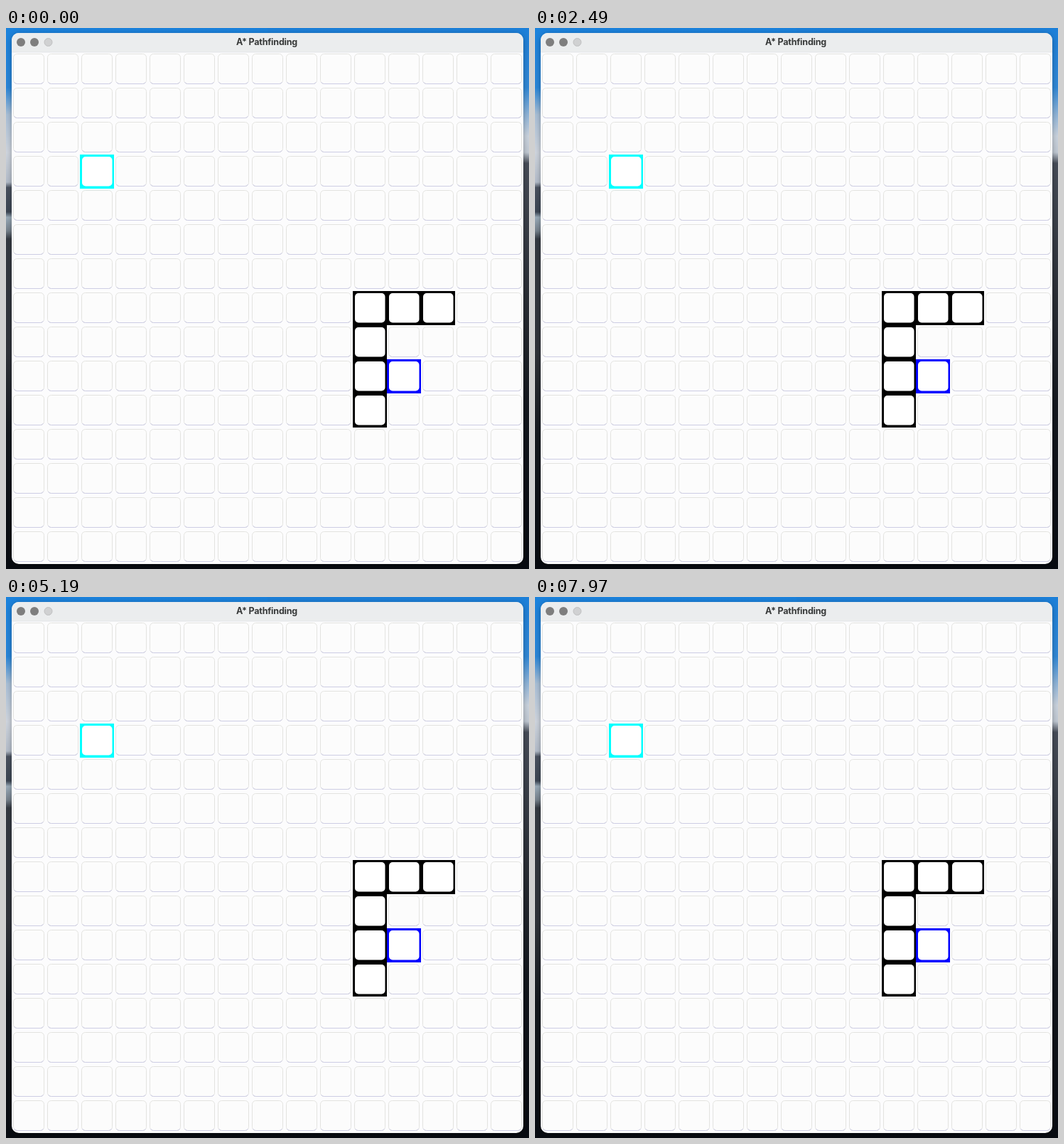
An HTML page that plays this animation: 736x761 px, repeating every 7990 ms.

```html
<!DOCTYPE html>
<html lang="en">
<head>
<meta charset="utf-8">
<title>Pathfinding grid</title>
<style>
  html, body { margin: 0; width: 100%; height: 100%; overflow: hidden; background: #080b11; }
  svg { display: block; width: 736px; height: 761px; }
  .title { font: 700 12.5px Inter, sans-serif; letter-spacing: -.2px; fill: #363838; text-anchor: middle; }
</style>
</head>
<body>
<!-- The scene holds one steady pose, so it loops without timers. -->
<svg viewBox="0 0 736 761">
  <defs>
    <linearGradient id="left" x2="0" y2="1">
      <stop offset="0" stop-color="#1b82dc"/>
      <stop offset=".11" stop-color="#2a86d8"/>
      <stop offset=".16" stop-color="#a9bfd6"/>
      <stop offset=".23" stop-color="#cfd5de"/>
      <stop offset=".285" stop-color="#b4bdca"/>
      <stop offset=".295" stop-color="#4a525f"/>
      <stop offset=".34" stop-color="#3c4654"/>
      <stop offset=".35" stop-color="#9aabb9"/>
      <stop offset=".375" stop-color="#76818c"/>
      <stop offset=".39" stop-color="#353a42"/>
      <stop offset=".6" stop-color="#30333a"/>
      <stop offset=".75" stop-color="#15191f"/>
      <stop offset="1" stop-color="#080b11"/>
    </linearGradient>
    <linearGradient id="right" x2="0" y2="1">
      <stop offset="0" stop-color="#1c7fd8"/>
      <stop offset=".11" stop-color="#3188d6"/>
      <stop offset=".16" stop-color="#8fb4d8"/>
      <stop offset=".2" stop-color="#c9d2dd"/>
      <stop offset=".23" stop-color="#c0c8d2"/>
      <stop offset=".25" stop-color="#474d58"/>
      <stop offset=".5" stop-color="#2a2e35"/>
      <stop offset=".7" stop-color="#14181e"/>
      <stop offset="1" stop-color="#080b11"/>
    </linearGradient>
    <filter id="soft" x="-5%" y="-5%" width="110%" height="110%">
      <feGaussianBlur stdDeviation="4"/>
    </filter>
    <clipPath id="frame"><rect x="8" y="7" width="720" height="747" rx="10"/></clipPath>
    <pattern id="cells" x="8" y="34" width="48" height="48" patternUnits="userSpaceOnUse">
      <rect x="2.5" y="2.5" width="43" height="42" rx="5" fill="#fcfcfc" stroke="#e3e3e0"/>
      <path d="M3.5 42Q4.5 44.5 7.5 44.5H40.5Q43.5 44.5 44.5 42" fill="none" stroke="#cdcde4"/>
    </pattern>
  </defs>

  <rect width="368" height="761" fill="url(#left)"/>
  <rect x="368" width="368" height="761" fill="url(#right)"/>
  <rect x="8" y="9" width="720" height="747" rx="10" opacity=".3" filter="url(#soft)"/>

  <g clip-path="url(#frame)">
    <rect x="8" y="7" width="720" height="747" fill="#fcfcfd"/>
    <rect x="8" y="7" width="720" height="27" fill="#ebedee"/>
    <path d="M8 34H728" stroke="#e3e5e7"/>
    <rect x="8" y="34" width="720" height="720" fill="url(#cells)"/>
    <g id="marks"></g>
  </g>

  <circle cx="21" cy="20" r="6" fill="#7e7e7e"/>
  <circle cx="40" cy="20" r="6" fill="#7e7e7e"/>
  <circle cx="59.5" cy="20" r="5.5" fill="#d0d1d2" stroke="#bfc0c1"/>
  <text class="title" x="367" y="24.3">A* Pathfinding</text>
</svg>
<script>
  const marks = document.getElementById('marks');
  const CELL = 48, LEFT = 8, TOP = 34;

  function addRect(x, y, width, height, rx, fill) {
    const rect = document.createElementNS(marks.namespaceURI, 'rect');
    for (const [key, value] of Object.entries({ x, y, width, height, rx, fill })) {
      rect.setAttribute(key, value);
    }
    marks.append(rect);
  }

  function markCell(col, row, color) {
    const x = LEFT + col * CELL, y = TOP + row * CELL;
    addRect(x, y, CELL, CELL, 0, color);
    addRect(x + 3, y + 3, 42.5, 41.5, 5, '#fff');
  }

  const walls = [[10, 7], [11, 7], [12, 7], [10, 8], [10, 9], [10, 10]];
  walls.forEach(([col, row]) => markCell(col, row, '#000'));
  markCell(2, 3, '#0ff');
  markCell(11, 9, '#00f');
</script>
</body>
</html>
```
